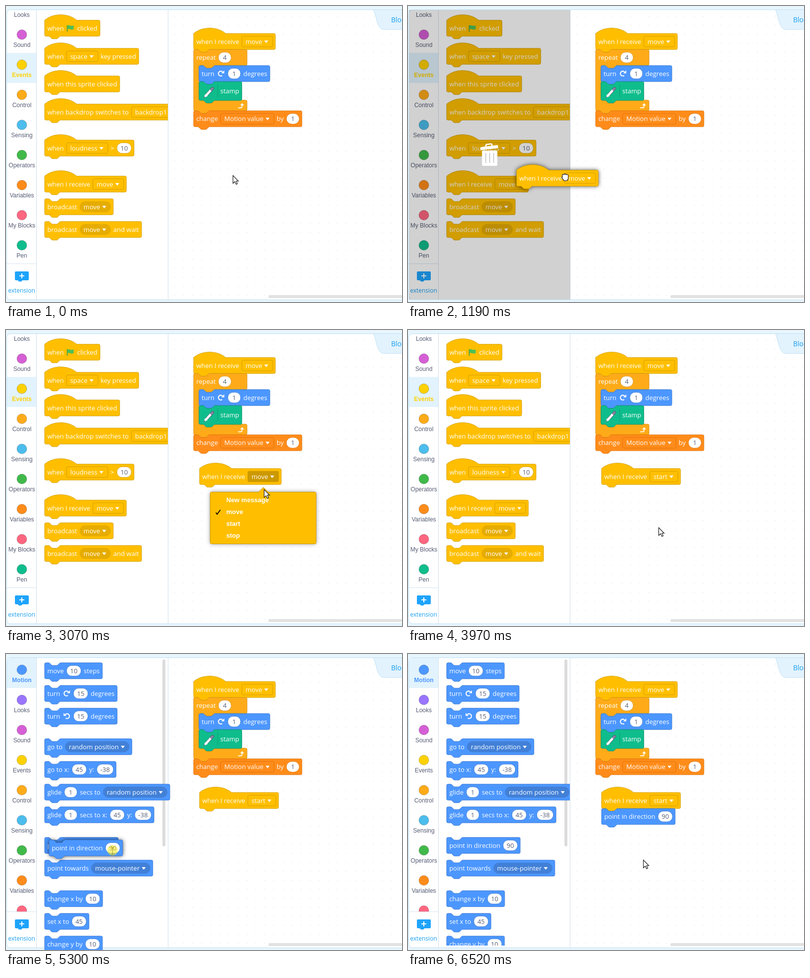
These frames come from a looping animation (800x600 px, 6800 ms). An HTML page with a canvas:

```html
<!DOCTYPE html>
<html lang="en">
<head>
<meta charset="utf-8">
<title>Block editor</title>
<style>
html, body { margin: 0; width: 100%; height: 100%; overflow: hidden; background: #e8f5fd; }
canvas { display: block; }
</style>
</head>
<body>
<canvas id="stage" width="800" height="600"></canvas>
<script>
const ctx = document.getElementById('stage').getContext('2d');
const LOOP = 6800, UNIT = 0.675, GAP = 5.4;
const BLOCK_FONT = '13px "Open Sans", sans-serif';

// fill, outline, round menu
const COLORS = {
  events: ['#ffbf00', '#cc9900', '#e6ac00'],
  control: ['#ffab19', '#cf8b17', '#ec9c13'],
  motion: ['#4c97ff', '#3373cc', '#4280d7'],
  data: ['#ff8c1a', '#db6e00', '#ff8000'],
  pen: ['#0fbd8c', '#0b8e69', '#0da57a']
};

const CATEGORIES = [
  ['Motion', '#4c97ff'], ['Looks', '#9a75ff'], ['Sound', '#d55fd5'], ['Events', '#ffd100'],
  ['Control', '#ffab19'], ['Sensing', '#4cbdec'], ['Operators', '#40b94a'],
  ['Variables', '#ff8c1a'], ['My Blocks', '#ff6680'], ['Pen', '#0fbd8c']
];

// Prefixes: # number, [ square menu, ( round menu, @ icon, ! divider
const EVENT_BLOCKS = [
  [45, 'when|@flag|clicked'], [102, 'when|[space|key pressed'], [158, 'when this sprite clicked'],
  [215, 'when backdrop switches to|[backdrop1'], [288, 'when|[loudness|>|#10'],
  [361, 'when I receive|[move'], [407, 'broadcast|(move'], [453, 'broadcast|(move|and wait']
];
const MOTION_BLOCKS = [
  [34, 'move|#10|steps'], [80, 'turn|@cw|#15|degrees'], [126, 'turn|@ccw|#15|degrees'],
  [188, 'go to|(random position'], [234, 'go to x:|#45|y:|#-38'],
  [280, 'glide|#1|secs to|(random position'], [326, 'glide|#1|secs to x:|#45|y:|#-38'],
  [388, 'point in direction|#90'], [434, 'point towards|(mouse-pointer'],
  [496, 'change x by|#10'], [542, 'set x to|#45'], [588, 'change y by|#10']
];

const within = (t, a, b) => t >= a && t < b;
// The pointer is sampled n times between a and b, the first sample already moved.
const stepped = (t, a, b, n) =>
  Math.max(0, Math.min(n, Math.floor((t - a) / (b - a) * (n - 1) + 1e-6) + 1)) / n;
const curve = (p, from, via, to) =>
  from.map((v, i) => (1 - p) ** 2 * v + 2 * p * (1 - p) * via[i] + p * p * to[i]);

const POINTER_MOVES = [
  [80, 720, 8, [458, 343], [30, 50], [142, 368]],
  [820, 1490, 8, [142, 368], [336, 357], [455, 304]],
  [2005, 2120, 3, [455, 304], [490, 302], [521, 308]],
  [3070, 3710, 8, [521, 308], [522, 369], [506, 400]],
  [4080, 4081, 1, [506, 400], [490, 405], [475, 410]],
  [4240, 4910, 8, [475, 410], [250, 480], [161, 386]],
  [5190, 5390, 3, [161, 386], [176, 393], [268, 406]],
  [5700, 5960, 4, [268, 406], [371, 366], [474, 327]],
  [6240, 6520, 4, [474, 327], [470, 370], [475, 417]]
];

function pointerAt(t) {
  const move = POINTER_MOVES.filter(m => m[0] <= t).pop();
  if (!move) return POINTER_MOVES[0][3];
  const [a, b, n, ...path] = move;
  return curve(stepped(t, a, b, n), ...path);
}

function rect(x, y, w, h, r, fill, stroke) {
  ctx.beginPath();
  ctx.roundRect(x, y, w, h, r);
  if (fill) { ctx.fillStyle = fill; ctx.fill(); }
  if (stroke) { ctx.strokeStyle = stroke; ctx.stroke(); }
}

function poly(points, fill) {
  ctx.beginPath();
  for (let i = 0; i < points.length; i += 2) ctx.lineTo(points[i], points[i + 1]);
  ctx.closePath();
  ctx.fillStyle = fill;
  ctx.fill();
}

function line(x1, y1, x2, y2, color, width = 1) {
  ctx.beginPath();
  ctx.moveTo(x1, y1);
  ctx.lineTo(x2, y2);
  ctx.strokeStyle = color;
  ctx.lineWidth = width;
  ctx.stroke();
}

function text(str, x, y, color, font = BLOCK_FONT, align = 'left') {
  ctx.font = font;
  ctx.textAlign = align;
  ctx.fillStyle = color;
  ctx.fillText(str, x, y);
}

function at(x, y, draw) {
  ctx.save();
  ctx.translate(x, y);
  draw();
  ctx.restore();
}

const NOTCH = 'c2 0 3 1 4 2l4 4c1 1 2 2 4 2h12c2 0 3-1 4-2l4-4c1-1 2-2 4-2';
const BUMP = 'c-2 0-3 1-4 2l-4 4c-1 1-2 2-4 2h-12c-2 0-3-1-4-2l-4-4c-1-1-2-2-4-2';
const TOP = 'M0 4A4 4 0 0 1 4 0H12' + NOTCH;
const HAT = 'M0 0c25-22 71-22 96 0';
const BOTTOM = `a4 4 0 0 1-4 4H48${BUMP}H4a4 4 0 0 1-4-4z`;
const rightEdge = w => `H${w - 4}a4 4 0 0 1 4 4`;

function shape(x, y, path, [fill, stroke], raised) {
  at(x, y, () => {
    ctx.scale(UNIT, UNIT);
    const p = new Path2D(path);
    if (raised) { ctx.shadowBlur = 9; ctx.shadowColor = 'rgba(0,0,0,.7)'; }
    ctx.fillStyle = fill;
    ctx.fill(p);
    ctx.shadowColor = 'transparent';
    ctx.lineWidth = 1.2;
    ctx.strokeStyle = stroke;
    ctx.stroke(p);
  });
}

const ICONS = {
  flag() {
    line(1.5, -6, 1.5, 7, '#45993d', 1.6);
    ctx.fillStyle = '#4cbf56';
    ctx.fill(new Path2D('M2-5.5c4-2 6 2.5 12.5 0v7.5c-6 2.500-8-2-12.500 0z'));
  },
  cw() {
    ctx.translate(7.500, 0);
    ctx.beginPath();
    ctx.arc(0, 0, 4.8, Math.PI * .3, Math.PI * 1.75);
    ctx.strokeStyle = '#fff';
    ctx.lineWidth = 2.2;
    ctx.stroke();
    poly([1, -.5, 7, -.5, 7, -6.5], '#fff');
  },
  ccw() {
    ctx.translate(16.2, 0);
    ctx.scale(-1, 1);
    ICONS.cw();
  },
  pen() {
    ctx.lineCap = 'round';
    line(10, 8, 22, -5, '#575e75', 6);
    line(10, 8, 18, -1, '#fff', 4.5);
    line(19.5, -2.5, 22, -5, '#8d86a8', 4);
    poly([4, 14, 7, 6.500, 12, 10.5], '#fff');
    poly([4, 14, 5.2, 10.8, 7.4, 12.7], '#575e75');
  }
};

function partWidth(part) {
  ctx.font = BLOCK_FONT;
  const body = ctx.measureText(part.slice(1)).width;
  switch (part[0]) {
    case '#': return Math.max(26, body + 14.5);
    case '[': case '(': return body + 28.8;
    case '@': return part === '@pen' ? 27 : 16.2;
    case '!': return 0;
    default: return ctx.measureText(part).width;
  }
}

function drawPart(part, x, y, w, [fill, stroke, field], open) {
  const type = part[0], body = part.slice(1);
  ctx.lineWidth = 0.8;
  if (type === '#') {
    rect(x, y - 10.8, w, 21.6, 10.8, '#fff', stroke);
    text(body, x + w / 2, y + 4.6, '#575e75', BLOCK_FONT, 'center');
  } else if (type === '[' || type === '(') {
    const round = type === '(';
    rect(x, y - 10.8, w, 21.6, round ? 10.8 : 2.7, round ? field : open ? stroke : fill, round ? field : stroke);
    text(body, x + 7.5, y + 4.6, '#fff');
    poly([x + w - 17, y - 2, x + w - 9, y - 2, x + w - 13, y + 3.2], '#fff');
  } else if (type === '@') {
    at(x, y, ICONS[body]);
  } else if (type === '!') {
    line(x, y - 13, x, y + 13, stroke, 0.7);
  } else {
    text(part, x, y + 4.6, '#fff');
  }
}

// y is the middle of the row
function block(kind, x, y, spec, { hat, raised, open, height = 32.4 } = {}) {
  const parts = spec.split('|'), widths = parts.map(partWidth), color = COLORS[kind];
  const width = widths.reduce((sum, w) => sum + w + GAP, GAP) / UNIT;
  const path = (hat ? HAT : TOP) + rightEdge(width) + `V${height / UNIT - 4}` + BOTTOM;
  shape(x, y - height / 2, path, color, raised);
  let px = x + GAP;
  parts.forEach((part, i) => {
    drawPart(part, px, y, widths[i], color, open);
    px += widths[i] + GAP;
  });
}

function repeatBlock(x, y) {
  const color = COLORS.control;
  const path = TOP + rightEdge(160) + `V44a4 4 0 0 1-4 4H64${BUMP}H20a4 4 0 0 0-4 4V148a4 4 0 0 0 4 4` +
    rightEdge(160) + 'V180' + BOTTOM;
  shape(x, y - 16.2, path, color);
  drawPart('repeat', x + GAP, y, 0, color);
  drawPart('#4', x + 50, y, 26, color);
  at(x + 96, y + 98, () => {
    ctx.strokeStyle = '#fff';
    ctx.lineWidth = 1.8;
    ctx.stroke(new Path2D('M-6 4H-1Q2 4 2-1'));
    poly([-2, -1, 6, -1, 2, -5.5], '#fff');
  });
}

function backdrop() {
  ctx.fillStyle = '#e8f5fd';
  ctx.fillRect(0, 0, 800, 600);
  ctx.lineWidth = 1;
  rect(1.5, 7.5, 820, 588, 8, '#fff', '#bfe0f3');
  ctx.fillStyle = '#dedede';
  for (let x = 340; x < 800; x += 18.25)
    for (let y = 20; y < 586; y += 18.25) ctx.fillRect(x, y, 1.3, 1.3);
  ctx.fillStyle = '#e2f3fe';
  ctx.strokeStyle = '#bfe0f3';
  const tab = new Path2D('M742 7.500C749 18 748 47.500 764 47.500H810V7.500z');
  ctx.lineWidth = 1;
  ctx.fill(tab);
  ctx.stroke(tab);
  text('Blocks', 778, 33, '#1a9ff0', '14px "Open Sans", sans-serif');
  rect(530, 586, 290, 6, 3, '#e2e2e2');
}

function sidebar(active, scroll) {
  ctx.save();
  ctx.beginPath();
  ctx.rect(2, 8, 59, 514);
  ctx.clip();
  CATEGORIES.forEach(([name, color], i) => {
    const y = 32 + 61 * i - scroll, on = name === active;
    if (on) {
      ctx.fillStyle = '#e2f3fe';
      ctx.fillRect(2, y - 24, 59, 61);
    }
    ctx.lineWidth = 1;
    rect(22, y - 10, 20, 20, 10, color, 'rgba(0,0,0,.22)');
    text(name, 32, y + 25, on ? color : '#575e75',
      (on ? 'bold ' : '') + '12px "Liberation Sans", Arial, sans-serif', 'center');
  });
  ctx.restore();
  line(2, 522.5, 61, 522.5, '#d5e3ee');
  line(61.5, 8, 61.5, 595, '#cfdfea');
  line(327.5, 8, 327.5, 595, '#cfdfea');
  rect(18, 538, 28, 18, 2, '#1ea4fc');
  poly([23, 555, 34, 555, 31, 558.5, 26, 558.5], '#1ea4fc');
  line(27, 547, 37, 547, '#fff', 2);
  line(32, 542, 32, 552, '#fff', 2);
  text('extension', 31.5, 581, '#1a9ff0', '12px "Open Sans", sans-serif', 'center');
}

function palette(motion, unclipped) {
  if (motion) rect(316, 11, 6, 379, 3, '#dcdcdc');
  ctx.save();
  ctx.beginPath();
  ctx.rect(62, 8, unclipped ? 738 : 265, unclipped ? 592 : 583);
  ctx.clip();
  for (const [y, spec] of motion ? MOTION_BLOCKS : EVENT_BLOCKS)
    block(motion ? 'motion' : 'events', 78, y, spec, { hat: spec.startsWith('when') });
  ctx.restore();
}

function script() {
  block('events', 379, 72, 'when I receive|[move', { hat: true });
  repeatBlock(379, 104.4);
  block('motion', 389.8, 137, 'turn|@cw|#1|degrees');
  block('pen', 389.8, 172.3, '@pen|!|stamp', { height: 38 });
  block('data', 379, 228.6, 'change|[Motion value|by|#1');
}

function trashShade() {
  ctx.fillStyle = 'rgba(0,0,0,.18)';
  ctx.fillRect(2, 8, 325.5, 587);
  rect(149.5, 293, 31, 31, 2, '#fff');
  for (const x of [157, 165, 173]) line(x, 298, x, 318, '#cfcfcf', 2);
  at(164, 286, () => {
    ctx.rotate(-0.12);
    rect(-18, -2, 36, 6, 2, '#fff');
    ctx.lineWidth = 2.5;
    rect(-6, -6, 12, 6, 2, null, '#fff');
  });
}

function menu(alpha, hoverY) {
  const rows = [['New message', 344], ['move', 368], ['start', 392.500], ['stop', 416.5]];
  ctx.save();
  ctx.globalAlpha = alpha;
  ctx.shadowBlur = 9;
  ctx.shadowColor = 'rgba(0,0,0,.4)';
  ctx.lineWidth = 1;
  rect(412.5, 328.5, 214, 105, 3, '#ffbf00');
  ctx.shadowColor = 'transparent';
  rect(412.5, 328.5, 214, 105, 3, null, '#cc9900');
  poly([510, 329.5, 520, 319, 530, 329.5], '#ffbf00');
  line(510, 328.5, 520, 319, '#cc9900');
  line(520, 319, 530, 328.5, '#cc9900');
  for (const [label, y] of rows) {
    if (within(hoverY, y - 12, y + 12)) {
      ctx.fillStyle = 'rgba(0,0,0,.2)';
      ctx.fillRect(417, y - 12, 205, 24);
    }
    text(label, 445, y + 4.6, '#fff', 'bold 13px "Liberation Sans", Arial, sans-serif');
  }
  ctx.strokeStyle = '#000';
  ctx.lineWidth = 1.7;
  ctx.stroke(new Path2D('M424 370l2.500 3.500 6.500-9'));
  ctx.restore();
}

const ARROW = new Path2D('M.5.5V16.500L4.300 13 7 18.500 9.500 17.300 7 12H11.500z');
const HAND = new Path2D('M-5.500 1V-4.500q1.500-2 3 0q1.500-3 3-.5q1.500-2 3 .5q3-1 3 2v4.500q0 3-2.500 5.500h-6.500q-1-3-3.500-5q-1.500-2 .5-2.500z');

function pointer(t) {
  const [x, y] = pointerAt(t);
  const beam = within(t, 5190, 5390);
  const hand = within(t, 720, 2490) || within(t, 4910, 6300);
  at(x, y, () => {
    if (beam) {
      ctx.strokeStyle = '#333';
      ctx.lineWidth = 1;
      ctx.stroke(new Path2D('M-3-6.500H-1L0-5.500 1-6.500H3M0-5.500V8.500M-3 9.500H-1L0 8.500 1 9.500H3'));
    } else {
      ctx.fillStyle = '#fff';
      ctx.strokeStyle = '#111';
      ctx.lineWidth = 1.1;
      ctx.fill(hand ? HAND : ARROW);
      ctx.stroke(hand ? HAND : ARROW);
    }
    const clicks = [[820, 1110], [2300, 2490], [3800, 3970], [5020, 5390]];
    if (clicks.some(([a, b]) => within(t, a, b))) rect(-10.5, -10.5, 21, 21, 10.5, 'rgba(250,235,30,.55)');
  });
}

function draw(t) {
  const motion = t >= 4080;
  const hatDrag = within(t, 820, 2005), turnDrag = within(t, 5190, 6240);
  const [px, py] = pointerAt(t);
  const shaded = px < 328 && (within(t, 1010, 2005) || within(t, 5380, 6240));
  const menuAlpha = within(t, 2490, 3800) ? stepped(t, 2490, 2790, 4) : within(t, 3800, 3970) ? (t < 3885 ? 1 : .5) : 0;

  backdrop();
  sidebar(motion ? 'Motion' : 'Events', motion ? 0 : 96);
  script();
  if (t >= 2005) {
    block('events', 391, 297, 'when I receive|[' + (t < 3970 ? 'move' : 'start'),
      { hat: true, open: menuAlpha > 0 });
  }
  if (t >= 6240) block('motion', 391, 329.4, 'point in direction|#90');
  palette(motion, within(t, 5190, 5700));
  if (shaded) trashShade();
  if (hatDrag) {
    const [x, y] = curve(stepped(t, 820, 1490, 8), [78, 361], [204, 369], [391, 297]);
    block('events', x, y, 'when I receive|[move', { hat: true, raised: true });
  }
  if (turnDrag) {
    const [x, y] = t < 5700
      ? curve(stepped(t, 5190, 5390, 3) ** 3, [78, 388], [77, 396], [185, 408])
      : curve(stepped(t, 5700, 5960, 4), [185, 408], [288, 368], [391, 329.4]);
    block('motion', x, y, 'point in direction|#90', { raised: true });
  }
  if (menuAlpha) menu(menuAlpha, t < 3070 ? 0 : py);
  pointer(t);
}

const start = performance.now();
function tick() {
  draw((performance.now() - start) % LOOP);
  requestAnimationFrame(tick);
}
tick();
</script>
</body>
</html>
```
